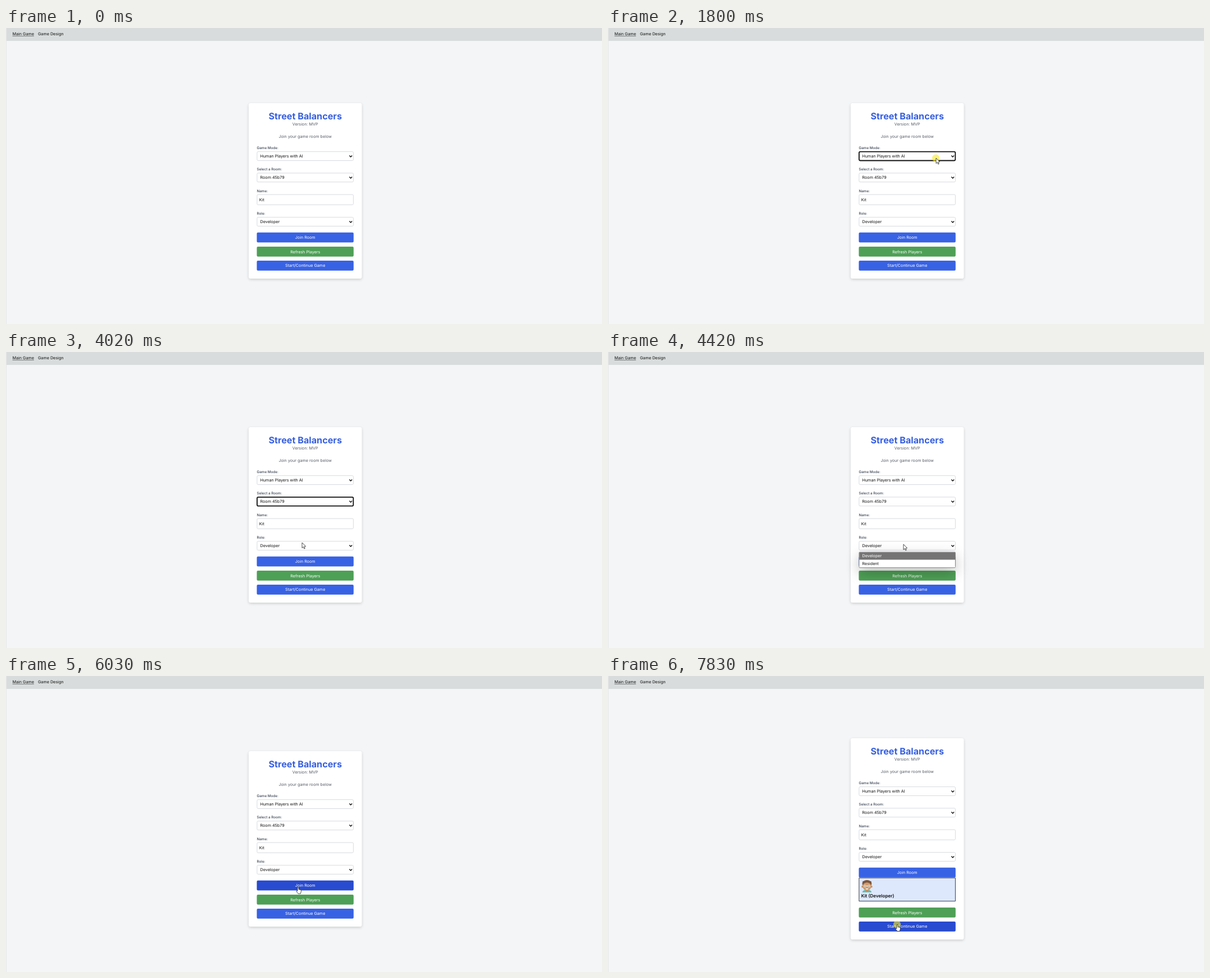
Recreate the animation shown at these times as an HTML page with a canvas. Size 1061x528 px, loop 8 s.

```html
<!DOCTYPE html>
<html lang="en">
<head>
<meta charset="utf-8">
<title>Game room</title>
<style>
  html, body { margin: 0; width: 100%; height: 100%; overflow: hidden; background: #f4f5f7; }
  canvas { display: block; width: 1061px; height: 528px; }
</style>
</head>
<body>
<canvas id="stage"></canvas>
<script>
const W = 1061, H = 528, LOOP = 8000;
const LEFT = 446.5, WIDTH = 172.3, MID = 532.7;
const BLUE = '#3862e4', BLUE_HOVER = '#294bcf', GREEN = '#4ea056', GREEN_HOVER = '#3f8849';
const PLAYER = 'Kit';

const canvas = document.getElementById('stage');
const ratio = window.devicePixelRatio || 1;
canvas.width = W * ratio;
canvas.height = H * ratio;
const ctx = canvas.getContext('2d');
ctx.scale(ratio, ratio);
ctx.textRendering = 'geometricPrecision';

// The screen updates about five times a second.
const tickAt = ms => Math.floor((ms + 14) / 200.8);

// Pointer way-points: tick, x, y
const path = [
  [1, 953, 469], [3, 722, 300], [4, 600, 243], [5, 584, 232], [9, 584, 232],
  [12, 564, 263], [16, 564, 263], [20, 527, 340], [21, 526, 343], [26, 526, 343],
  [29, 520, 376], [32, 520, 376], [33, 522, 377], [35, 522, 377],
  [36, 521, 387], [38, 517, 432], [39, 515, 443]
];
const clicks = [9, 16, 21, 39];

const popups = [
  { from: 5, to: 9, y: 239.8, pick: 0, items: ['Human Players with AI', 'Human Players Only', 'AI Players Only'] },
  { from: 13, to: 16, y: 278, pick: 1, items: ['Room 95345', 'Room 45b79', 'Room 6d0ae', 'Room d864d', 'Room eb939'] },
  { from: 21, to: 25, y: 357, pick: 0, items: ['Developer', 'Resident'] }
];

function pointer(k) {
  if (k < path[0][0]) return null;
  const i = path.findIndex(p => p[0] > k);
  if (i < 0) return path[path.length - 1].slice(1);
  const [a, ax, ay] = path[i - 1], [b, bx, by] = path[i];
  const u = (k - a) / (b - a);
  return [ax + (bx - ax) * u, ay + (by - ay) * u];
}

function text(str, x, y, { size = 7.2, weight = 400, color = '#111', align = 'left' } = {}) {
  ctx.font = `${weight} ${size}px Inter, "Liberation Sans", sans-serif`;
  ctx.textAlign = align;
  ctx.fillStyle = color;
  ctx.fillText(str, x, y);
}

function box(x, y, w, h, r, fill, { stroke, line = 0.8, shadow } = {}) {
  ctx.save();
  ctx.beginPath();
  ctx.roundRect(x, y, w, h, r);
  if (shadow) {
    ctx.shadowColor = shadow.color;
    ctx.shadowBlur = shadow.blur * ratio;
    ctx.shadowOffsetY = shadow.y * ratio;
  }
  ctx.fillStyle = fill;
  ctx.fill();
  ctx.shadowColor = 'transparent';
  if (stroke) {
    ctx.strokeStyle = stroke;
    ctx.lineWidth = line;
    ctx.stroke();
  }
  ctx.restore();
}

function shape(points, fill, stroke, line = 1) {
  ctx.beginPath();
  points.forEach(([x, y]) => ctx.lineTo(x, y));
  if (fill) { ctx.closePath(); ctx.fillStyle = fill; ctx.fill(); }
  if (stroke) { ctx.strokeStyle = stroke; ctx.lineWidth = line; ctx.stroke(); }
}

function oval(x, y, rx, ry, fill, from = 0, to = 7) {
  ctx.beginPath();
  ctx.ellipse(x, y, rx, ry, 0, from, Math.min(to, from + Math.PI * 2));
  ctx.fillStyle = fill;
  ctx.fill();
}

function field(label, labelY, y, h, value, x) {
  text(label, LEFT, labelY, { size: 6.3, weight: 500, color: '#374151' });
  box(LEFT + 0.4, y, WIDTH - 0.8, h, 2, '#fff', { stroke: '#cdd1d7' });
  text(value, x, y + h / 2 + 2.7);
}

function select(label, labelY, y, value, focus) {
  field(label, labelY, y, 15.9, value, 452.5);
  if (focus) {
    ctx.beginPath();
    ctx.roundRect(LEFT + 0.5, y, WIDTH - 1, 15.9, 2.2);
    ctx.strokeStyle = '#101010';
    ctx.lineWidth = 1.8;
    ctx.stroke();
  }
  shape([[611.3, y + 6.8], [613.7, y + 9.3], [616.1, y + 6.8]], null, '#111', 1.4);
}

function button(label, y, color, hoverColor, p) {
  const over = p && p[0] > LEFT && p[0] < LEFT + WIDTH && p[1] > y && p[1] < y + 17.8;
  box(LEFT, y, WIDTH, 17.8, 2, over ? hoverColor : color);
  text(label, MID, y + 11.5, { color: '#fff', align: 'center' });
  return over;
}

function popup({ y, pick, items }) {
  const row = 13.4, h = items.length * row + 0.8;
  box(447, y, 171.4, h, 1.2, '#fff', {
    stroke: '#777', line: 0.8, shadow: { color: 'rgba(0,0,0,.28)', blur: 24, y: 8 }
  });
  items.forEach((item, i) => {
    const top = y + 0.3 + i * row;
    if (i === pick) box(447.3, top - 0.1, 170.8, row, 0, '#747474');
    text(item, 452.5, top + 9.1, { color: i === pick ? '#fff' : '#111' });
  });
}

function avatar() {
  oval(461, 386, 8.2, 5, '#62bdb0', Math.PI, Math.PI * 2);
  box(458.8, 380, 4.4, 4, 1.5, '#bd8458');
  oval(461, 370.5, 8.4, 6.3, '#7c563d');
  oval(452.9, 375.8, 1.5, 2, '#c58e62');
  oval(469.1, 375.8, 1.5, 2, '#c58e62');
  oval(461, 375.2, 7.5, 7.8, '#cf9a6e');
  for (let i = 0; i < 5; i++) oval(455.2 + i * 2.9, 368 - Math.sin(i * Math.PI / 4) * 1.8, 2.3, 2.2, '#7c563d');
  for (const x of [457.7, 464.3]) {
    oval(x, 374.8, 2.5, 2.3, '#e9dfcf');
    oval(x, 374.8, 0.7, 0.8, '#43352c');
  }
  shape([[460, 374.6], [462, 374.6]], null, '#eee4d4', 0.8);
  oval(461, 379, 2.6, 1.8, '#fff', 0, Math.PI);
}

function playerCard() {
  box(LEFT + 0.4, 360.2, WIDTH - 0.8, 41.4, 0, '#dde8fc', { stroke: '#20293a', line: 0.9 });
  avatar();
  text(`${PLAYER} (Developer)`, 450.7, 394.6, { size: 8.1, weight: 600 });
}

function arrow(x, y) {
  shape([[x, y], [x, y + 9.6], [x + 2.2, y + 7.6], [x + 3.8, y + 11], [x + 5.3, y + 10.3],
    [x + 3.8, y + 7], [x + 6.7, y + 6.8], [x, y]], '#fff', '#222', 0.8);
}

function hand(x, y) {
  ctx.beginPath();
  ctx.moveTo(x - 1, y + 7.5);
  ctx.lineTo(x - 1, y + 1);
  ctx.quadraticCurveTo(x, y - 0.8, x + 1, y + 1);
  ctx.lineTo(x + 1, y + 4.6);
  ctx.lineTo(x + 4.8, y + 5.6);
  ctx.quadraticCurveTo(x + 5.8, y + 6.2, x + 5.5, y + 8);
  ctx.lineTo(x + 4.3, y + 12.3);
  ctx.lineTo(x, y + 12.3);
  ctx.lineTo(x - 3.2, y + 8);
  ctx.quadraticCurveTo(x - 2.9, y + 6.4, x - 1, y + 7.5);
  ctx.fillStyle = '#fff';
  ctx.fill();
  ctx.strokeStyle = '#222';
  ctx.lineWidth = 0.8;
  ctx.stroke();
}

function page() {
  box(0, 0, W, H, 0, '#f4f5f7');
  box(0, 0, W, 23, 0, '#d8dcdc');
  box(0, 0, 1, H, 0, '#e4e6e8');
  text('Main Game', 11.5, 13);
  box(11.5, 14, 38.3, 0.6, 0, '#222');
  text('Game Design', 57, 13);
}

function draw(k) {
  const p = pointer(k);
  const joined = k >= 33;
  const shift = joined ? 23 : 0;
  const focus = (from, to) => k >= from && k < to;
  const center = { color: '#555c66', align: 'center' };

  page();
  box(432, 134 - shift, 201.5, 313 + shift * 2, 3.6, '#fff', {
    shadow: { color: 'rgba(0,0,0,.16)', blur: 5, y: 1.8 }
  });

  ctx.save();
  ctx.translate(0, -shift);
  text('Street Balancers', MID, 162.8, { size: 16.2, weight: 700, color: '#3760e0', align: 'center' });
  text('Version: MVP', MID, 173.9, center);
  text('Join your game room below', MID, 196, center);
  select('Game Mode:', 216.2, 220.6, 'Human Players with AI', focus(9, 13));
  select('Select a Room:', 254.4, 258.8, 'Room 45b79', focus(16, 21));
  field('Name:', 292.5, 297.1, 18.2, PLAYER, 450.8);
  select('Role:', 333.4, 337.6, 'Developer', focus(25, 30));
  const local = y => p && [p[0], p[1] + y];
  let over = button('Join Room', 364.8, BLUE, BLUE_HOVER, local(shift));
  ctx.restore();

  if (joined) playerCard();

  ctx.save();
  ctx.translate(0, shift);
  over = button('Refresh Players', 390, GREEN, GREEN_HOVER, local(-shift)) || over;
  over = button('Start/Continue Game', 414.9, BLUE, BLUE_HOVER, local(-shift)) || over;
  ctx.restore();

  const open = popups.find(m => k >= m.from && k < m.to);
  if (open) popup(open);

  if (!p) return;
  if (clicks.includes(k)) oval(p[0] - 0.4, p[1] + 0.2, 6.6, 6.6, 'rgba(250,235,25,.6)');
  if (over && !open) hand(p[0], p[1]);
  else arrow(p[0], p[1]);
}

function frame() {
  draw(tickAt(performance.now() % LOOP));
  requestAnimationFrame(frame);
}
frame();
</script>
</body>
</html>
```
